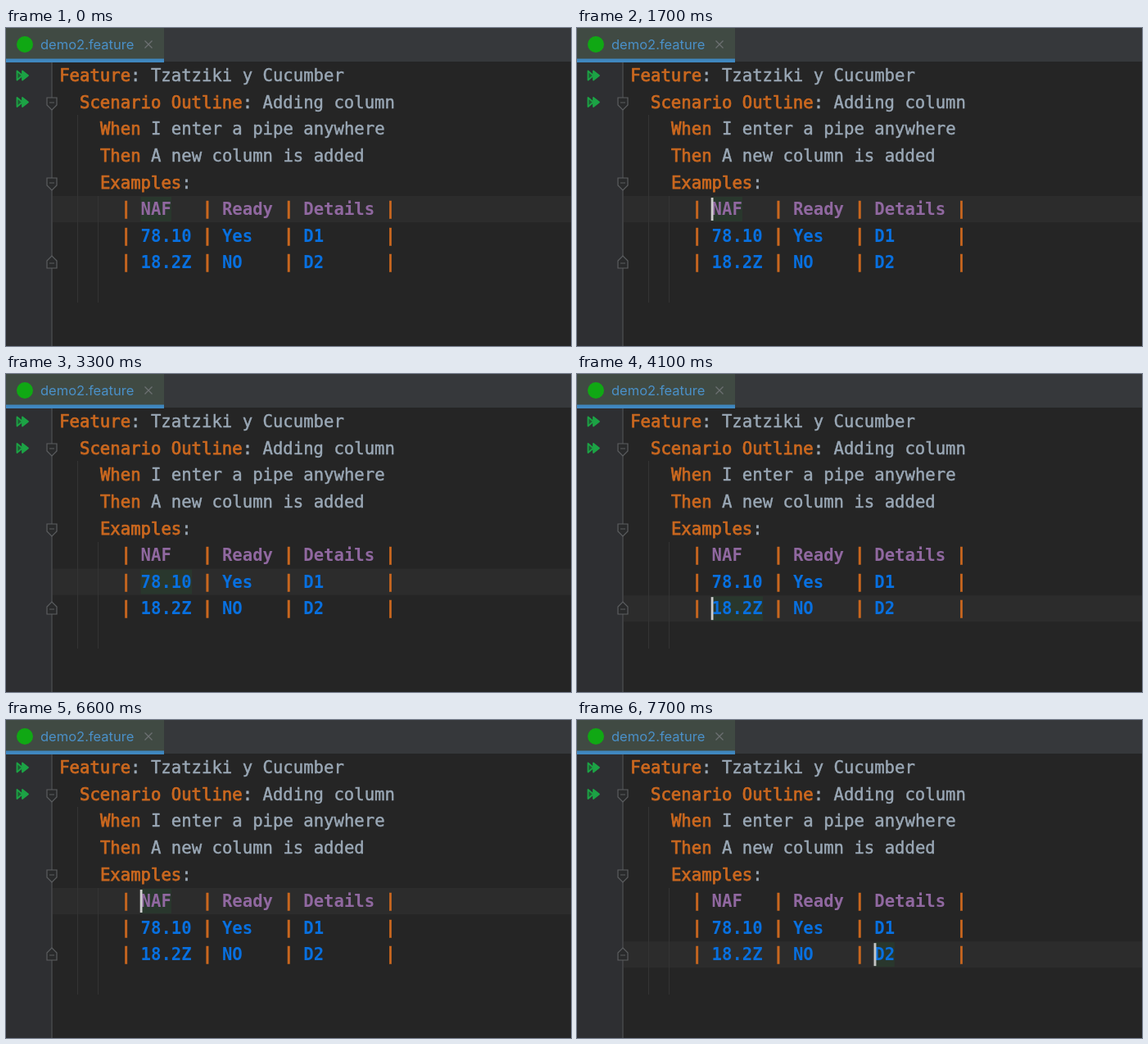
Recreate the animation shown at these times as an HTML page. Size 690x388 px, loop 8000 ms.

```html
<!DOCTYPE html>
<html lang="en">
<head>
<meta charset="utf-8">
<title>Adding column</title>
<style>
  html, body { margin: 0; width: 100%; height: 100%; overflow: hidden; background: #252525; }
  svg { display: block; width: 690px; height: 388px; }

  /* Thin strokes give the text its medium weight */
  .code { font: 20.64px "DejaVu Sans Mono", monospace; fill: #9aa8b6; stroke: #9aa8b6; stroke-width: .45; }
  .code text { white-space: pre; }
  .key, .pipe { fill: #cb681f; stroke: #cb681f; }
  .key { stroke-width: .75; }
  .pipe { font-weight: bold; stroke-width: .6; }
  .head, .value { font-weight: bold; stroke: none; }
  .head { fill: #9068a0; }
  .value { fill: #0870e0; }
  .tab { font: 16.5px Inter, sans-serif; fill: #4a90c8; }
  .fold { fill: #292a2b; stroke: #5c5e60; stroke-width: 1.2; }
  .guide { stroke: #343434; }

  /* Shared 8 s clock, hard steps only */
  .row, .column, .cell, .caret { animation: 8s step-end -20ms infinite; }
  .row { animation-name: row; }
  .column { animation-name: column; }
  .cell { animation-name: cell; }
  .caret { animation-name: blink; }

  @keyframes row {
    0%, 75% { transform: translateY(0); }
    28.75%, 83.75% { transform: translateY(32.57px); }
    43.75%, 87.5%, 100% { transform: translateY(65.14px); }
  }
  @keyframes column {
    0%, 75% { transform: translateX(0); }
    56.25%, 93.75% { transform: translateX(99.4px); }
    63.75%, 96.25%, 100% { transform: translateX(198.8px); }
  }
  @keyframes cell {
    0%, 75% { width: 37.5px; }
    28.75%, 83.75% { width: 62.5px; }
    56.25%, 93.75%, 100% { width: 24.5px; }
  }
  @keyframes blink {
    0%, 11.25%, 26.25%, 36.25%, 71.25% { opacity: 0; }
    3.75%, 18.75%, 28.75%, 43.75%, 75%, 100% { opacity: 1; }
  }
</style>
</head>
<body>
<svg viewBox="0 0 690 388">
  <defs>
    <g id="run" stroke="#1ca345" stroke-width="1.8" stroke-linejoin="round">
      <path d="M-6.5-5.5 0 0-6.5 5.5z" fill="#205c34"/>
      <path d="M0-5.5 7 0 0 5.5z" fill="#1ca345"/>
    </g>
    <path id="shield" class="fold" d="M-6-7H6V2L0 8-6 2zM-3-1H3"/>
  </defs>

  <!-- Editor and gutter -->
  <rect width="690" height="388" fill="#252525"/>
  <rect width="56" height="388" fill="#2e2f32"/>
  <g class="row"><rect x="57" y="205" width="633" height="32" fill="#2c2c2c"/></g>
  <path class="guide" d="M87.5 106V335M112.5 205V335"/>
  <path d="M56 41V388" stroke="#4c4e50" stroke-width="1.3"/>
  <use href="#shield" x="56" y="92"/>
  <use href="#shield" x="56" y="190"/>
  <use href="#shield" transform="translate(56 286) scale(1 -1)"/>
  <use href="#run" x="20" y="58"/>
  <use href="#run" x="20" y="90.5"/>

  <!-- Tab bar -->
  <rect width="690" height="41" fill="#36383b"/>
  <rect width="193" height="41" fill="#404a43"/>
  <rect y="37.5" width="193" height="4.5" fill="#3f87bf"/>
  <circle cx="23" cy="20" r="10" fill="#10a814"/>
  <text class="tab" x="42" y="26">demo2.feature</text>
  <path d="M169.5 15.5l9 9m0-9l-9 9" stroke="#6c7072" stroke-width="1.3"/>

  <!-- Word highlight under the caret -->
  <g class="row"><g class="column">
    <rect class="cell" x="164.5" y="206" height="30" fill="#29372d"/>
  </g></g>

  <g class="code">
    <text x="65.2" y="65.3"><tspan class="key">Feature</tspan>: Tzatziki y Cucumber</text>
    <text x="90" y="97.9"><tspan class="key">Scenario Outline</tspan>: Adding column</text>
    <text x="114.9" y="130.4"><tspan class="key">When</tspan> I enter a pipe anywhere</text>
    <text x="114.9" y="163"><tspan class="key">Then</tspan> A new column is added</text>
    <text x="114.9" y="195.6"><tspan class="key">Examples</tspan>:</text>
    <text class="head" x="164.6" y="228.2">NAF     Ready   Details</text>
    <text class="value" x="164.6" y="260.7">78.10   Yes     D1</text>
    <text class="value" x="164.6" y="293.3">18.2Z   NO      D2</text>
    <g id="pipes">
      <text class="pipe" x="140.4" y="227.2">|       |       |         |</text>
    </g>
    <use href="#pipes" y="32.57"/>
    <use href="#pipes" y="65.14"/>
  </g>

  <g class="row"><g class="column">
    <rect class="caret" x="163.7" y="207" width="2.8" height="28" fill="#cdcdcd"/>
  </g></g>
</svg>
</body>
</html>
```
